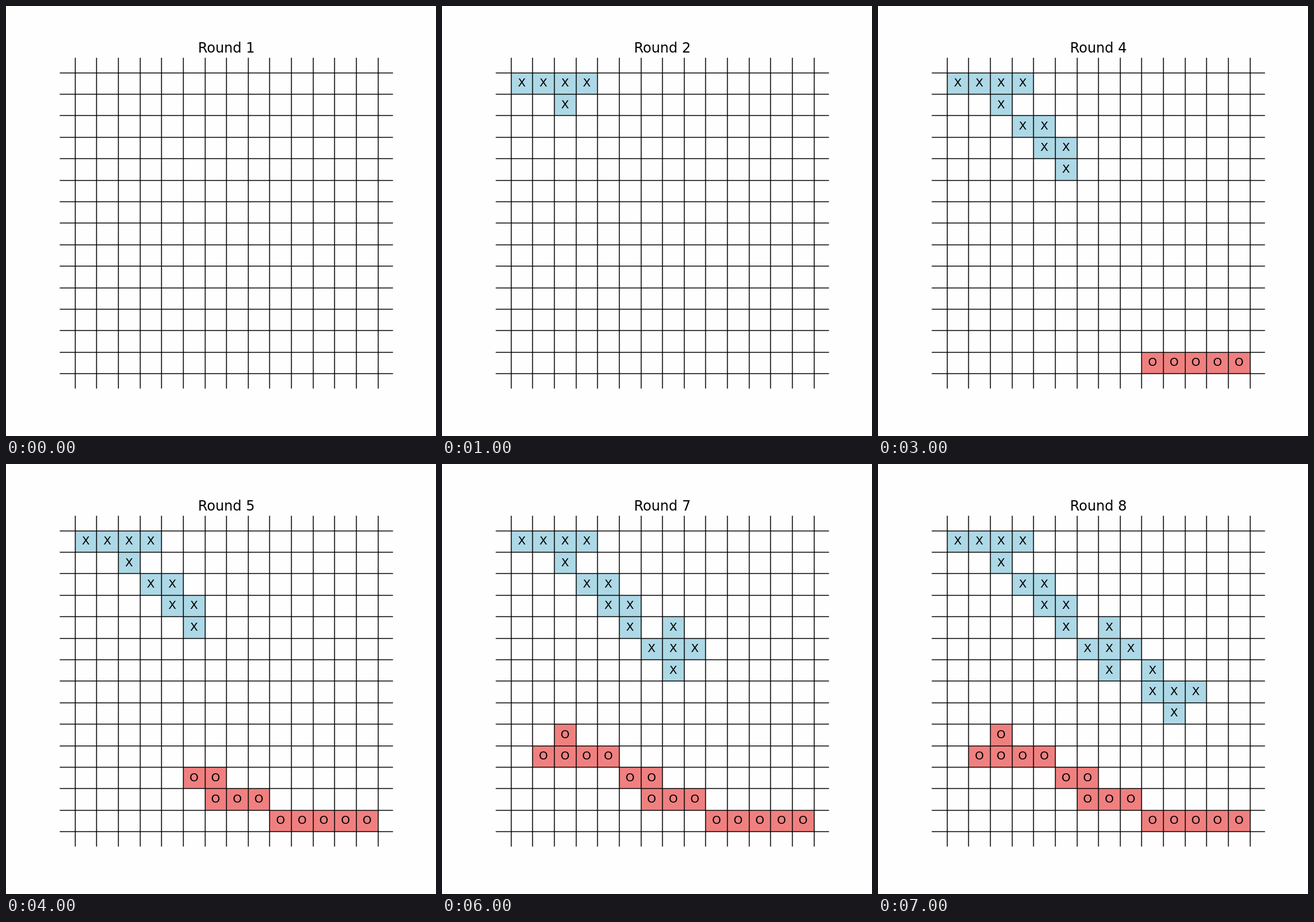
An HTML page for the animation above (8000 ms loop, 748 by 748 pixels).

```html
<!DOCTYPE html>
<html lang="en">
<head>
<meta charset="utf-8">
<title>Rounds</title>
<style>
  html, body { margin: 0; width: 100%; height: 100%; overflow: hidden; background: #fefefe; }
  svg { display: block; width: 748px; height: 748px; }
  text { font-family: "DejaVu Sans", sans-serif; font-size: 20px; text-anchor: middle; }
  #title { font-size: 24px; }
  path { stroke: #000; stroke-width: 1.55; }
</style>
</head>
<body>
<svg viewBox="0 0 748 748">
  <g id="pieces"></g>
  <path id="grid"/>
  <g id="marks"></g>
  <text id="title" x="383.3" y="81"></text>
</svg>
<script>
const ROUND_MS = 1000, ROUNDS = 8, LINES = 15;
const CELL_W = 37.64, CELL_H = 37.4;
const cellX = col => 120.2 + CELL_W * col;
const cellY = row => 116.05 + CELL_H * row;

// One piece of five "column,row" cells is placed per round from round 2; X and O alternate.
const pieces = [
  "0,0 1,0 2,0 3,0 2,1",
  "9,13 10,13 11,13 12,13 13,13",
  "3,2 4,2 4,3 5,3 5,4",
  "5,11 6,11 6,12 7,12 8,12",
  "7,4 6,5 7,5 8,5 7,6",
  "2,9 1,10 2,10 3,10 4,10",
  "9,6 9,7 10,7 11,7 10,8"
];
const players = [{ mark: "X", fill: "#add8e6" }, { mark: "O", fill: "#f08080" }];

const byId = id => document.getElementById(id);

function add(parent, tag, attributes) {
  const node = document.createElementNS("http://www.w3.org/2000/svg", tag);
  for (const name in attributes) node.setAttribute(name, attributes[name]);
  return parent.appendChild(node);
}

let grid = "";
for (let i = 0; i < LINES; i++) {
  const x = Math.floor(cellX(i)) + 0.5, y = Math.floor(cellY(i)) + 0.5;
  grid += `M${x} 90V665.5M93.5 ${y}H673.2`;
}
byId("grid").setAttribute("d", grid);

const layers = pieces.map((piece, i) => {
  const { mark, fill } = players[i % 2];
  const squares = add(byId("pieces"), "g", { fill });
  const marks = add(byId("marks"), "g", {});
  for (const cell of piece.split(" ")) {
    const [col, row] = cell.split(",").map(Number);
    add(squares, "rect", { x: cellX(col), y: cellY(row), width: CELL_W, height: CELL_H });
    add(marks, "text", { x: cellX(col) + CELL_W / 2 - 0.2, y: Math.round(140.2 + CELL_H * row) })
      .textContent = mark;
  }
  return [squares, marks];
});

const start = performance.now();
function draw() {
  const elapsed = performance.now() - start;
  const round = Math.floor(elapsed / ROUND_MS) % ROUNDS + 1;
  byId("title").textContent = "Round " + round;
  layers.forEach((layer, i) => {
    for (const group of layer) group.style.display = i + 2 <= round ? "" : "none";
  });
  requestAnimationFrame(draw);
}
draw();
</script>
</body>
</html>
```
